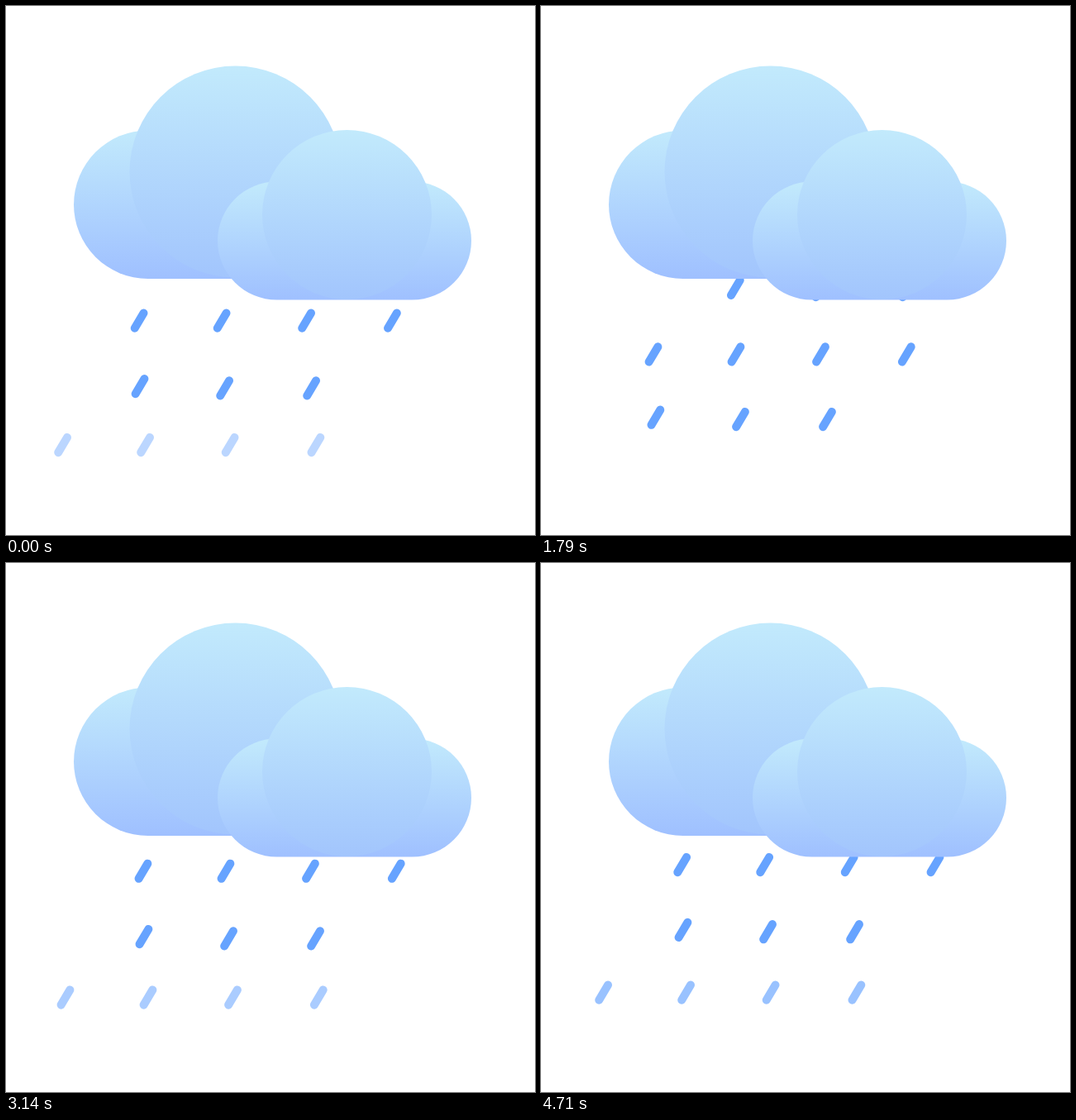
Recreate the animation shown at these times as an HTML page with a canvas. Size 640x640 px, loop 4.78 s.

```html
<!DOCTYPE html>
<html lang="en">
<head>
<meta charset="utf-8">
<title>Rain clouds</title>
<style>
  html, body { margin: 0; width: 100%; height: 100%; overflow: hidden; background: #fff; }
  canvas { display: block; width: 100%; height: 100%; }
</style>
</head>
<body>
<canvas id="stage" width="640" height="640"></canvas>
<script>
const ctx = document.getElementById('stage').getContext('2d');

const LOOP = 4780;          // ms
const STEPS = 67;           // pictures per loop, 14 per second
const PERIOD = 20;          // ticks between two rows of the same group, 25 ticks per second
const FADE_START = 19;
const FADE_END = 28;
const SLANT = 0.615;        // horizontal drift per pixel of fall
const DROP_COLOR = '#66a3ff';

// x is the position of a drop when its path crosses y = 440.
const GROUPS = [
  { lead: 0, drops: [[124.6, 0], [224.6, 0], [327.1, 0], [430.9, 0]] },
  { lead: 10, drops: [[175.8, -2.3], [278.4, 0], [383.4, 0]] }
];

const mod = (a, n) => ((a % n) + n) % n;

function tickAt(ms) {
  const shown = Math.floor(mod(ms, LOOP) / 10) * 10 + 5;
  const step = Math.min(STEPS - 1, Math.floor(shown * 14 / 1000));
  return Math.floor(step * 25 / 14 - 0.2);
}

// Slow start, fastest in the middle, slow end.
function fallY(age) {
  const u = age - 9.1;
  return 422.3 + 8.29 * u - 0.00447 * u ** 3;
}

function drawDrop(x, y) {
  ctx.beginPath();
  ctx.moveTo(x + 5.4, y - 9.1);
  ctx.lineTo(x - 5.4, y + 9.1);
  ctx.stroke();
}

function drawRow(drops, age) {
  if (age >= FADE_END) return;
  const y = fallY(age);
  ctx.globalAlpha = Math.min(1, (FADE_END - age) / (FADE_END - FADE_START));
  for (const [x, dy] of drops) drawDrop(x - (y - 440) * SLANT, y + dy);
}

function drawRain(tick) {
  ctx.strokeStyle = DROP_COLOR;
  ctx.lineWidth = 10;
  ctx.lineCap = 'round';
  for (const { lead, drops } of GROUPS) {
    const age = mod(tick - 15 + lead, PERIOD);
    for (const shift of [-PERIOD, 0, PERIOD]) {
      if (age + shift >= -12) drawRow(drops, age + shift);
    }
  }
  ctx.globalAlpha = 1;
}

function shade(top, bottom, endColor) {
  const g = ctx.createLinearGradient(0, top, 0, bottom);
  g.addColorStop(0, '#c2eafc');
  g.addColorStop(1, endColor);
  return g;
}

function drawPill(left, top, right, bottom) {
  ctx.fillStyle = shade(top, bottom, '#9fc0ff');
  ctx.beginPath();
  ctx.roundRect(left, top, right - left, bottom - top, (bottom - top) / 2);
  ctx.fill();
}

function drawPuff(x, y, r) {
  ctx.fillStyle = shade(y - r, y + r, '#a2c5fd');
  ctx.beginPath();
  ctx.arc(x, y, r, 0, Math.PI * 2);
  ctx.fill();
}

function drawClouds() {
  drawPill(82, 150.5, 390, 330);
  drawPuff(277.5, 200.5, 128);
  drawPill(256, 212.5, 563, 355.5);
  drawPuff(412.5, 252.5, 102.5);
}

function render() {
  ctx.fillStyle = '#fff';
  ctx.fillRect(0, 0, 640, 640);
  drawRain(tickAt(performance.now()));
  drawClouds();
  requestAnimationFrame(render);
}
render();
</script>
</body>
</html>
```
